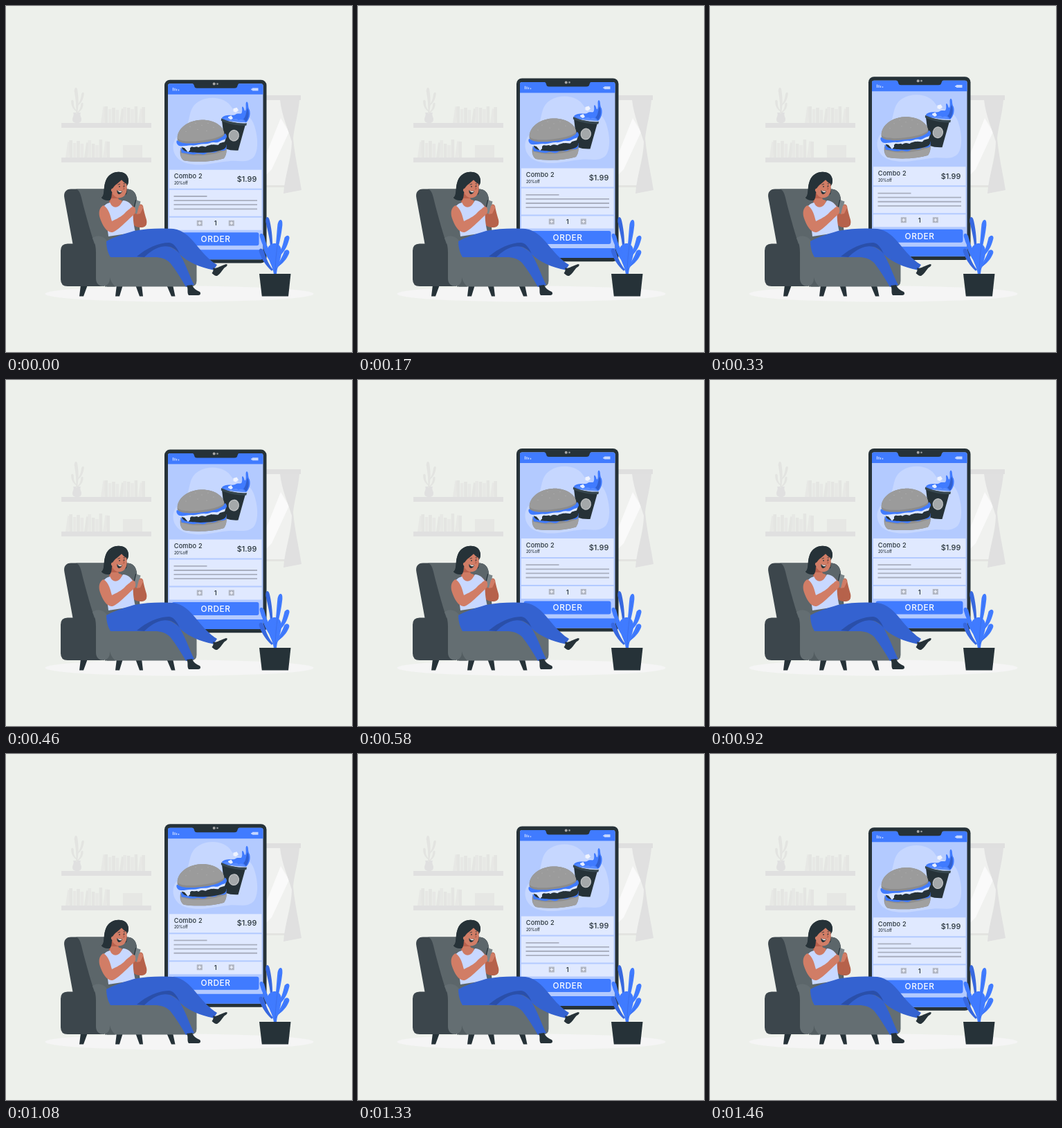
Write an HTML page that moves like this. It is 500 by 500 pixels and loops after 1500 ms.

```html
<!DOCTYPE html>
<html lang="en">
<head>
<meta charset="utf-8">
<title>Ordering food</title>
<style>
html, body { margin: 0; width: 100%; height: 100%; overflow: hidden; background: #edf0eb; }
svg { display: block; width: 100%; height: 100%; }
text { font-family: Inter, "Open Sans", sans-serif; font-weight: 500; fill: #263238; }
</style>
</head>
<body>
<svg viewBox="0 0 500 500">
  <rect width="500" height="500" fill="#edf0eb"/>

  <!-- shelves -->
  <g id="books"></g>
  <g fill="#e0e0e0">
    <path d="M80 169H210V176H80zM80 219H210V226H80z"/>
    <path d="M97 154H108C106 158 109 160 109 164C109 167 107 169 103 169C98 169 96 167 96 164C96 160 99 158 97 154Z"/>
  </g>
  <g id="sprig"></g>
  <path d="M169 201H197V219H169z" fill="#e6e7e4"/>

  <!-- window -->
  <path d="M360 136H404V262H360z" fill="#e3e4e1"/>
  <path d="M360 136H409L414 196L403 259H360z" fill="#f0f1ef"/>
  <path d="M397 162L409 182L384 236L376 244V214z" fill="#fafafa"/>
  <path d="M396 136H424C422 158 417 172 415 191C417 216 423 240 427 266L401 271C403 244 413 220 413 196C407 176 399 160 396 136z" fill="#e0e0e0"/>
  <path d="M371 129H426V136H371z" fill="#dfdfdf"/>

  <ellipse cx="250.500" cy="416" rx="194" ry="11.500" fill="#f5f5f5"/>

  <!-- floating phone -->
  <g id="phone">
    <rect x="229" y="106.500" width="147.500" height="264.700" rx="8" fill="#263238"/>
    <rect x="234" y="112" width="137.500" height="254" rx="3" fill="#b3caff"/>
    <path d="M237 112H368.500Q371.500 112 371.500 115V127.500H234V115Q234 112 237 112z" fill="#407bff"/>
    <path d="M268 111H338Q335 112 334.500 115Q334 118.500 330 118.500H276Q272.500 118.500 272 115Q271.500 112 268 111z" fill="#263238"/>
    <circle cx="300.700" cy="112.400" r="2" fill="#a6a6a6"/>
    <circle cx="305.500" cy="112.400" r="1.300" fill="#939a9d"/>
    <path d="M241.500 117.800V122.300M244 118.600V122.300M246.500 119.600V122.300M249.500 120.400V122.300" stroke="#c6d7ff" stroke-width="1.300"/>
    <path d="M356 118.200H364.500V122.200H356V121.300H354.300V119.200H356z" fill="#c6d7ff"/>

    <path d="M258 178C268 165 262 148 278 138C295 128 318 132 326 146C332 156 350 152 357 168C364 184 366 208 358 218C348 228 335 222 322 224C300 226 280 233 258 226C240 219 238 200 246 190C250 185 254 183 258 178Z" fill="#c6d7ff"/>

    <!-- drink -->
    <path d="M312 161C318 155 326 159 331 157C336 153 340 158 341 153C342 149 340 146 342 145C345 148 344 152 346 151C348 147 345 139 348 138C351 139 349 146 352 150C354 157 351 165 347 168L313 165Z" fill="#407bff"/>
    <path d="M343 163C347 160 347 152 349 147C352 153 351 162 347 167z" fill="#2f5fd0"/>
    <path d="M328.500 148L333.500 146.500L336 150.500L332 153.500L328.500 152z" fill="#f0f4ff"/>
    <path d="M321 160L325.500 158L328 162L324 165L321 163.500z" fill="#e6eeff"/>
    <path d="M312 165L346 171L335.500 208.500Q325 209 317 206z" fill="#263238"/>
    <path d="M311 162C321 167 336 170 348 169L347.300 172.500C334 173 320 170 310.800 165.500z" fill="#37474f"/>
    <path d="M314 162C322 166 336 168.500 346 167.500C343 164 339 162.500 336 165C332 160 327 166 323 163C320 160 317 162 314 162z" fill="#5a8dff"/>
    <ellipse cx="329.300" cy="187" rx="7.700" ry="8.400" fill="#c4c6c8" transform="rotate(10 329.300 187)"/>
    <ellipse cx="329.300" cy="187" rx="6.600" ry="7.300" fill="#a4a8aa" transform="rotate(10 329.300 187)"/>

    <!-- burger -->
    <path d="M252 207C267 215 298 213 318 203C320 209 318 216 315 220C300 225 272 226 257 223C252 220 251 213 252 207Z" fill="#8f8f8f"/>
    <path d="M253 212C270 219 300 216 318 208C319 213 317 217 315 220C300 225 272 226 257 223C253 220 252 216 253 212Z" fill="#a0a0a0"/>
    <path d="M252 205C266 209 300 208 319 200L318 207C314 211 309 207 305 210C300 214 295 209 289 213C283 217 280 211 273 214C266 215 261 212 254 212z" fill="#407bff"/>
    <path d="M255 198C272 203 301 202 317 193C320 199 319 205 314 207C297 213 270 213 258 209C253 206 253 202 255 198z" fill="#263238"/>
    <path d="M250 197C270 202 301 199 318 190L316 196L309 198L304 204L297 200L290 202L284 208L276 203L270 204L263 211L258 205L251 203z" fill="#dce7ff"/>
    <path d="M266 205C270 200 274 208 280 203C286 200 290 207 296 201C302 198 306 204 313 197L313 205C302 210 279 212 266 209z" fill="#263238"/>
    <path d="M247 194C266 199 299 196 317 184C320 187 320 191 315 193C311 193 308 198 302 197C296 196 292 200 286 199C279 199 275 202 268 201C260 201 253 204 249 201C246 198 246 196 247 194z" fill="#407bff"/>
    <path d="M248 194C245 180 260 165.500 281 164.500C300 163.500 315 173 315.500 186C311 192 296 196 281 197.500C266 199 253 199 248 194Z" fill="#8b8b8b"/>
    <path d="M248 191C247 178 261 165.500 281 164.500C299 163.500 314 172 315.500 184C309 190 295 193 281 194.500C267 196 252 196 248 191Z" fill="#9b9b9b"/>
    <g id="seeds" fill="#afafaf"></g>

    <!-- order details -->
    <path d="M236 236.500H369.500V263.500H236zM236 265.500H369.500V303.500H236zM236 305.500H369.500V323.500H236z" fill="#e0e9ff"/>
    <text x="242.700" y="249.300" font-size="9.200" letter-spacing=".2">Combo 2</text>
    <text x="242.900" y="257.800" font-size="5.600">20%off</text>
    <text x="362.300" y="253.800" font-size="10.900" text-anchor="end">$1.99</text>
    <path d="M242.500 274.800H290.500M242.500 280.900H363M242.500 287H363M242.500 293.100H363" stroke="#a9afbf" stroke-width="1.800"/>
    <path d="M275.800 309.500h8v8h-8zM321.800 309.500h8v8h-8z" fill="#b0b5c1"/>
    <path d="M277.500 313.500h4.600M279.800 311.200v4.600M323.500 313.500h4.600M325.800 311.200v4.600" stroke="#f3f6ff" stroke-width="1.200"/>
    <text x="302.800" y="317.200" font-size="9.600" text-anchor="middle">1</text>
    <rect x="239.500" y="327" width="126" height="19" rx="3" fill="#407bff"/>
    <text x="303" y="340.800" font-size="11.800" letter-spacing=".6" text-anchor="middle" style="fill:#fff">ORDER</text>
    <path d="M234 352H371.500V363Q371.500 366 368.500 366H237Q234 366 234 363z" fill="#407bff"/>
  </g>

  <!-- armchair -->
  <path d="M108 403H118L112 419.500H106zM160 403H169L164 419.500H158zM187 403H196L198 419.500H193zM232 403H241L244.500 419.500H239z" fill="#263238"/>
  <path d="M84.500 278C82.500 269 87 264.500 94 264.500H174C184 264.500 188 270 189 279L196 352H98z" fill="#3c464c"/>
  <path d="M109 277C107 269 105 265 100 264.500H174C184 264.500 188 270 189 279L196 362H134C126 340 115 302 109 277z" fill="#5c666a"/>
  <path d="M146 346H266Q275.500 346 275.500 356V397Q275.500 405.500 267 405.500H146z" fill="#646e72"/>
  <path d="M150 366C148 385 148 396 158 405.500H143V350z" fill="#535d61"/>
  <path d="M89 343.500H142V405H89Q79 405 79 395V353.500Q79 343.500 89 343.500z" fill="#3c464c"/>
  <path d="M125 336C127 332 137 331 143 336C149 341 150 348 150 356V394C150 408.500 130 408.500 130 394V357C130 349 129 342 125 336z" fill="#646e72"/>

  <!-- woman -->
  <path d="M144 253C149 239 164 237 173 243C178 248 178 257 174 261C175 265 175 269 174 272L150 281C145 281 141 280 138 277C144 273 140 264 144 253z" fill="#263238"/>
  <path d="M176 283C183 287 193 300 200 307C205 313 204 319 196 320C187 321 180 314 173 306z" fill="#b6624b"/>
  <path d="M150 268L162 275L164 287C160 291 153 290 149 285z" fill="#b9614d"/>
  <path d="M140 291C146 283 152 284 156 283C160 289 166 287 169 281C176 281 181 286 184 292C183 305 184 315 187 327L148 333C147 318 141 306 140 291z" fill="#c8d8ff"/>
  <path d="M150 283C153 293 163 294 168 282C165 279 163 281 162 278L151 278z" fill="#ce7a63"/>
  <path d="M141 288C135 291 133 298 136 307C140 318 145 326 152 327C158 328 171 314 183 303L188 298L184 291C177 293 175 296 170 301C164 306 157 309 153 311C151 304 149 293 141 288z" fill="#d17d66"/>
  <path d="M190 318C199 322 205 318 203 309C201 302 199 296 198 289C196 285 192 286 191 290C191 297 193 304 193 309z" fill="#b6624b"/>
  <path d="M187 280L194.500 282.500L190 301L183 298z" fill="#7b8589"/>
  <path d="M187 280L188.300 280.400L184.300 298.500L183 298z" fill="#263238"/>
  <path d="M179 293C183 288 187 290 187 294C188 298 186 301 181 303zM192 289C195 286 198 288 198 292L194 300L189 301z" fill="#d17d66"/>
  <path d="M153 258C158 250 171 249 174 256C176 266 174 275 166 277C157 279 150 270 153 258z" fill="#d17d66"/>
  <path d="M144 253C149 239 166 237 173 243C177 247 178 252 176 258C172 256 169 254 167 251C163 256 157 258 154 264C152 270 154 277 150 281C144 281 140 280 138 277C143 273 140 264 144 253z" fill="#263238"/>
  <circle cx="154.500" cy="266" r="2.600" fill="#d17d66"/>
  <path d="M160.500 266C163 268 165 268 168 267.300C167 271 164 273 162 271.500C160.500 270 160.200 268 160.500 266z" fill="#263238"/>
  <path d="M161 266.300C163 268 165.500 268.100 167.500 267.500L166.700 269C164 269.500 162 268.500 161 266.300z" fill="#fff"/>
  <path d="M169 260L171 264.500L168.800 264.800" fill="none" stroke="#a95544" stroke-width=".8"/>
  <path d="M161.500 258.300L165 257.200M169.500 256.800L172 257" stroke="#263238" stroke-width=".8"/>
  <ellipse cx="164" cy="261" rx=".8" ry="1.100" fill="#263238"/>
  <ellipse cx="170.600" cy="260.300" rx=".7" ry="1.100" fill="#263238"/>

  <path d="M145 340C153 335 168 330 185 325C204 321 226 321 242 322C256 324 265 333 274 344C283 355 293 367 305 374L300 381.500C281 378 262 370 250 358C245 350 235 345 228 345C239 348 248 353 253 362C261 376 266 392 272 403L260 406C253 394 246 382 237 371C231 365 223 363 215 363H151C147 357 145 348 145 340z" fill="#3462d0"/>
  <path d="M189 362C203 350 220 342 236 342C244 343 248 352 251 358C243 348 234 346 224 348C213 351 206 357 200 363z" fill="#2a4fa9"/>
  <path d="M299 378C303 381 308 376 318 373C321 373 320 376 316 378C312 382 310 387 305 390C302 390.500 300 388 297.500 386C300 383 300 381 299 378z" fill="#263238"/>
  <path d="M261 404L269 403C271 409 276 411 280 413C282 415 281 418 278 418H264C261 414 264 409 261 404z" fill="#263238"/>

  <!-- plant -->
  <g id="plant"></g>
  <path d="M366 387H411.500L408 419.500H369.800z" fill="#263238"/>
</svg>
<script>
const $ = id => document.getElementById(id);

// Curved leaf from base to tip, widest near the tip
function leaf(bx, by, tx, ty, w, bend, fill) {
  const dx = tx - bx, dy = ty - by, n = Math.hypot(dx, dy);
  const nx = -dy / n, ny = dx / n;
  const at = (u, s) => `${(bx + dx * u + nx * s).toFixed(1)} ${(by + dy * u + ny * s).toFixed(1)}`;
  return `<path fill="${fill}" d="M${at(0, -w * .4)}C${at(.35, bend - w * .6)} ${at(.6, bend * .6 - w)} ${at(.87, -w)}` +
    `Q${at(1, -w * .8)} ${at(1, 0)}Q${at(1, w * .8)} ${at(.87, w)}` +
    `C${at(.6, bend * .6 + w)} ${at(.35, bend + w * .6)} ${at(0, w * .4)}Z"/>`;
}

function books(x, base, heights) {
  return heights.map((h, i) => {
    const left = x + i * 5.4, tilt = i % 5 === 0 ? 8 : 0;
    return `<rect x="${left}" y="${base - h}" width="4.6" height="${h}" fill="${i % 2 ? '#e4e5e2' : '#e7e8e5'}" transform="rotate(${tilt} ${left} ${base})"/>`;
  }).join('');
}

$('books').innerHTML =
  books(137, 169, [24, 24, 20, 22, 19, 21, 23, 22, 20, 24, 21, 23]) +
  books(86, 219, [23, 25, 21, 24, 20, 22, 25, 20, 18, 26, 24, 23]);

$('sprig').innerHTML = [
  [102, 156, 101, 118, 2.4, 2], [102, 152, 95, 136, 1.9, -3],
  [103, 144, 112, 125, 1.9, 3], [103, 154, 111, 140, 1.8, 3]
].map(a => leaf(...a, '#e3e4e1')).join('');

$('seeds').innerHTML = [
  [266, 174], [274, 169], [283, 172], [292, 169], [300, 175], [277, 178], [290, 180], [260, 181]
].map(([x, y]) => `<ellipse cx="${x}" cy="${y}" rx=".8" ry=".5"/>`).join('');

const blue = '#407bff', deep = '#3768df';
const trunk = '<path d="M387 388C386 374 376 366 378 350C383 341 393 341 397 349C401 362 392 372 391 388Z" fill="#407bff"/>';
$('plant').innerHTML = [
  [384, 356, 377.5, 305, 3, 2, deep],
  [385, 382, 367, 351, 3.4, -3, deep]
].map(a => leaf(...a)).join('') + trunk + [
  [389, 362, 397, 309, 3.5, 1, blue],
  [391, 364, 408, 332, 3.6, 4, blue],
  [390, 377, 408, 353, 3.8, 3, blue],
  [384, 362, 368, 329, 3.2, -3, blue],
  [386, 372, 373, 345, 3.2, -2, blue]
].map(a => leaf(...a)).join('') +
  '<path d="M389 388C389 366 392 345 396 319M389 382C396 374 402 366 406 357" fill="none" stroke="#3768df" stroke-width=".6"/>';

// The phone rises and sinks at an even pace, 24 steps a second
const loop = 1500, steps = 36, rise = 10;

function draw(ms) {
  const p = Math.floor((ms % loop) / loop * steps + .1) % steps / steps;
  const lift = rise * (1 - Math.abs(2 * p - 1));
  $('phone').setAttribute('transform', `translate(0 ${(.2 - lift).toFixed(3)})`);
}

let start;
function tick(now) {
  start ??= now;
  draw(now - start);
  requestAnimationFrame(tick);
}
draw(0);
requestAnimationFrame(tick);
</script>
</body>
</html>
```
